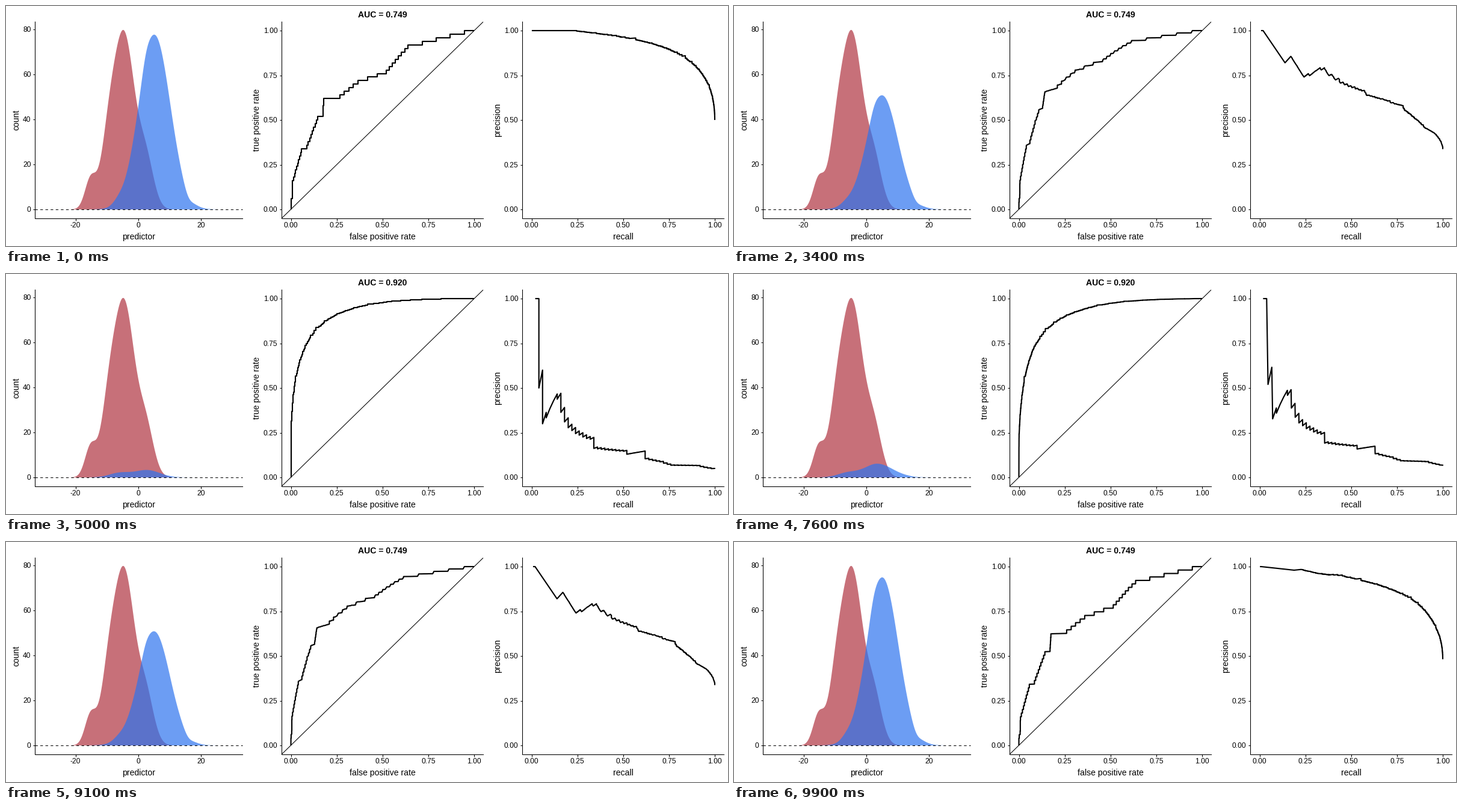
A matplotlib script for the animation above (10000 ms loop, 1200x400 px).

```python
import math

import matplotlib.pyplot as plt
import numpy as np
from matplotlib.animation import FuncAnimation
from matplotlib.patches import Polygon

W, H, DPI = 1200, 400, 100
PX = 72 / DPI
HOLD = 25
TOP, BOTTOM, ZERO = 26, 354, 339
UNIT_W, UNIT_H = 304.5, 298
RED, BLUE = "#b03341", "#2e74ee"

plt.rcParams["font.family"] = "Liberation Sans"
fig = plt.figure(figsize=(W / DPI, H / DPI), dpi=DPI, facecolor="white")
ax = fig.add_axes([0, 0, 1, 1])
ax.set(xlim=(0, W), ylim=(H, 0))
ax.axis("off")


# ---------- drawing helpers ----------
def line(x, y, width=1.07, **kw):
    kw.setdefault("solid_capstyle", "butt")
    return ax.plot(x, y, color="black", lw=width * PX, **kw)[0]


def text(x, y, s, size=12, **kw):
    kw.setdefault("ha", "center")
    return ax.text(x, y, s, fontsize=size * PX, va="baseline",
                   rotation_mode="anchor", **kw)


def panel(left, xticks, yticks, xlabel, ylabel, gap):
    right = left + 345 if left < 100 else left + 335
    line([left, left, right], [TOP, BOTTOM, BOTTOM],
         solid_joinstyle="miter", solid_capstyle="projecting", zorder=4)
    for x, s in xticks:
        line([x, x], [BOTTOM, BOTTOM + 3.5], zorder=4)
        text(x, 369, s)
    for y, s in yticks:
        line([left - 3.5, left], [y, y], zorder=4)
        text(left - 6.5, y + 4.3, s, ha="right")
    text((left + right) / 2, 389, xlabel, 14)
    text(left - gap, 190, ylabel, 14, rotation=90)


# ---------- densities as sums of bells: centre, spread, height ----------
values = np.linspace(-25, 25, 501)


def bells(*terms):
    total = sum(h * np.exp(-((values - c) / s) ** 2 / 2) for c, s, h in terms)
    return np.maximum(total, 0)


negative = bells((-4.5, 3.31, 76.5), (-9.6, 2.4, 24), (-15.2, 1.8, 13.3), (2.4, 2.5, 21))
common = bells((5.15, 5, 77.5), (2.3, 1.2, 2.6), (-6.5, 1.5, 1.2), (15.8, 1.3, -2))
rare = bells((2.8, 4, 3.25), (-6, 3.3, 1.95))


def area(counts):
    x = 220 + 5.22 * values
    y = ZERO - 3.75 * counts
    return np.column_stack([np.r_[x, x[-1], x[0]], np.r_[y, ZERO, ZERO]])


# ---------- rare class: 50 positives, 1000 negatives ----------
# true positives found -> false positives met so far
HITS = [2, 3, 4, 8, 9, 13, 17, 18, 26, 27, 31, 32, 36, 39, 44, 46, 50]
MISSES = [0, 2, 7, 9, 14, 37, 59, 88, 146, 175, 179, 267, 366, 522, 602, 640, 947]
k = np.arange(1, 51)
fp = np.r_[np.repeat(np.round(np.interp(k, HITS, MISSES)), 2), 1000]
tp = np.r_[0, np.repeat(k, 2)]
rare_roc = np.column_stack([fp / 1000, tp / 50])
rare_pr = np.column_stack([tp / 50, tp / np.maximum(tp + fp, 1)])[1:]

# ---------- balanced classes: two normals, two deviations apart ----------
cut = np.linspace(5, -4, 901)
upper = np.vectorize(lambda t: math.erfc(t / math.sqrt(2)) / 2)
curve_x = np.maximum(upper(cut) - .003, 0) / .997
curve_y = upper(cut - 2)
curve_s = (curve_x + curve_y) / 2

# small random stairs along the curve
rng = np.random.default_rng(7)
s = np.r_[0, np.sort(rng.uniform(0, 1, 300)), 1]
fpr = np.repeat(np.interp(s, curve_s, curve_x), 2)[:-1]
tpr = np.repeat(np.interp(s, curve_s, curve_y), 2)[1:]
even_s = (fpr + tpr) / 2
even_roc = np.column_stack([fpr, tpr])
even_pr = np.column_stack([tpr, tpr / (tpr + fpr)])


# ---------- morphing ----------
def pair(u0, a, u1, b):
    """Resample two paths on their shared parameter."""
    u = np.union1d(u0, u1)
    return [np.column_stack([np.interp(u, v, c) for c in path.T])
            for v, path in ((u0, a), (u1, b))]


def mix(ends, p, left):
    x, y = (ends[0] * (1 - p) + ends[1] * p).T
    return left + UNIT_W * x, ZERO - UNIT_H * y


roc = pair(rare_roc.sum(axis=1) / 2, rare_roc, even_s, even_roc)

# length along the jagged path decides which recall it meets on the smooth one
arc = np.r_[0, np.cumsum(np.hypot(*np.diff(rare_pr, axis=0).T))]
meet = np.interp(arc, arc[[0, 60, 67, 77, -1]], [0, .865, .94, .974, 1])
pr = pair(even_s, even_pr, np.interp(meet, curve_y, curve_s), rare_pr)

# ---------- fixed parts ----------
quarters = [(q / 4, f"{q / 4:.2f}") for q in range(5)]
rates_y = [(ZERO - UNIT_H * q, t) for q, t in quarters]


def rates_x(left):
    return [(left + UNIT_W * q, t) for q, t in quarters]


panel(48, [(220 + 5.22 * v, str(v)) for v in (-20, 0, 20)],
      [(ZERO - 3.75 * v, str(v)) for v in range(0, 81, 20)], "predictor", "count", 27)
panel(458, rates_x(473.5), rates_y, "false positive rate", "true positive rate", 36.5)
panel(858, rates_x(873.5), rates_y, "recall", "precision", 36.5)

ax.add_patch(Polygon(area(negative), fc=RED, alpha=.7, lw=0, zorder=1))
line([48, 393], [ZERO, ZERO], dashes=(4, 4), dash_capstyle="butt", zorder=3)
line([458, 793], [BOTTOM, TOP + .5])

# ---------- moving parts ----------
blue = ax.add_patch(Polygon(area(common), fc=BLUE, alpha=.7, lw=0, zorder=2))
roc_line = line([], [], 2.13, solid_joinstyle="round", zorder=5)
pr_line = line([], [], 2.13, solid_joinstyle="round", zorder=5)
title = text(625.5, 19, "", 14, weight="bold")


def draw(i):
    p = min(max(i - HOLD, 0), HOLD, 4 * HOLD - i) / HOLD
    blue.set_xy(area(common * (1 - p) + rare * p))
    roc_line.set_data(*mix(roc, p, 473.5))
    pr_line.set_data(*mix(pr, p, 873.5))
    title.set_text("AUC = 0.920" if p > .5 else "AUC = 0.749")
    return blue, roc_line, pr_line, title


anim = FuncAnimation(fig, draw, frames=4 * HOLD, interval=100, repeat=True, repeat_delay=0)
plt.show()
```
